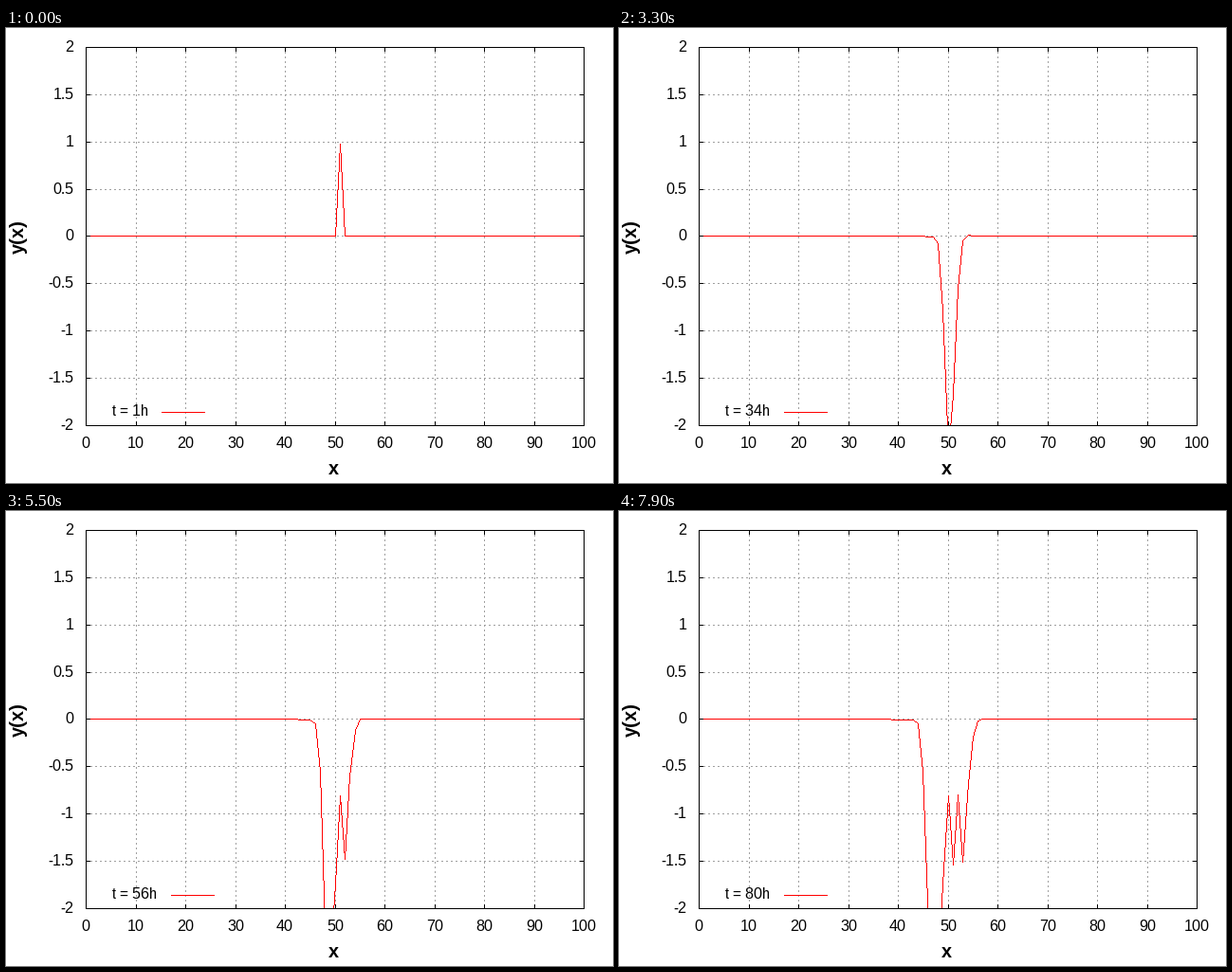
Animation, 640 px wide and 480 px high, one loop 8000 ms. Source, as a matplotlib script:

```python
import numpy as np
import matplotlib
import matplotlib.pyplot as plt
from matplotlib.animation import FuncAnimation

matplotlib.rcParams["font.family"] = "Liberation Sans"
matplotlib.rcParams["text.hinting"] = "native"
matplotlib.rcParams["text.hinting_factor"] = 1

W, H, DPI = 640, 480, 100
LEFT, RIGHT, TOP, BOTTOM = 84, 609, 20, 419
PX = 72 / DPI  # one pixel in points
RED, GRID = (255, 0, 0, 255), "#a0a0a0"
SITES = np.arange(101)
SOURCE = 51  # the driven site


def col(x):
    """Pixel column of a data x value."""
    return np.floor(LEFT + x * (RIGHT - LEFT) / 100 + 0.5)


def row(y):
    """Pixel row of a data y value."""
    return BOTTOM - np.floor((y + 2) * (BOTTOM - TOP) / 4 + 0.5)


def logistic(z):
    return 0.5 + 0.5 * np.tanh(z / 2)


def profile(t):
    """Trough that spreads both ways from the driven site, t in hours."""
    i = SITES
    ahead = i - SOURCE - 1
    rise = np.where(i < SOURCE,
                    logistic((t - 26 - 12 * (SOURCE - 1 - i)) / 4.4),
                    logistic((t - 32 - 20 * ahead) / 7))
    rise[SOURCE] = 1

    # The deep crest decays to a shelf whose neighbours swing in opposition
    settled = logistic((t + 24 * ahead) / 5)
    swing = 0.37 * np.cos(2 * np.pi * (t - 56) / 48) * np.where(i % 2, 1, -1)
    y = -rise * (1.17 + 1.58 * (1 - settled)) + swing * settled * rise ** 2

    # Small positive ripple running before the right front
    k = np.maximum(ahead, 0)
    ripple = 0.15 * 0.4 ** k * np.exp(-((t - 16 - 11 * k) / 7) ** 2 / 2)
    y += np.where(ahead >= 0, ripple, 0)

    y[SOURCE] = max(y[SOURCE], 0.98 - 0.204 * (t - 1))
    y[np.abs(y) < 0.01] = 0

    # Faint foot creeping out before the left front
    foot = (i < SOURCE) & (i > 47.4 - 0.16 * (t - 25))
    return np.where(foot, np.minimum(y, -0.01), y)


def trace(xs, ys):
    """Layer holding a hard one-pixel line, clipped to the plot box."""
    layer = np.zeros((H, W, 4), np.uint8)
    for xa, ya, xb, yb in zip(xs, ys, xs[1:], ys[1:]):
        n = int(max(abs(xb - xa), abs(yb - ya))) + 1
        c = np.floor(np.linspace(xa, xb, n) + 0.5).astype(int)
        r = np.floor(np.linspace(ya, yb, n) + 0.5).astype(int)
        inside = (r >= TOP) & (r <= BOTTOM)
        layer[r[inside], c[inside]] = RED
    return layer


fig = plt.figure(figsize=(W / DPI, H / DPI), dpi=DPI, facecolor="white")
ax = fig.add_axes([0, 0, 1, 1])
ax.axis("off")
curve = ax.imshow(np.zeros((H, W, 4), np.uint8), extent=(0, W, H, 0),
                  aspect="auto", interpolation="nearest", zorder=3)
ax.set_xlim(0, W)
ax.set_ylim(H, 0)


def stroke(xs, ys, color="black", **kw):
    line, = ax.plot(xs, ys, color=color, lw=PX, antialiased=False,
                    snap=False, **kw)
    return line


def label(x, y, text, size=16, **kw):
    return ax.text(x, y, text, fontsize=size * PX, **kw)


x0, x1, y0, y1 = LEFT + .5, RIGHT + .5, TOP + .5, BOTTOM + .5
TICK = 4
dots = dict(color=GRID, linestyle=(0, (2, 3)), dash_capstyle="butt", zorder=1)

for v in range(0, 101, 10):
    c = col(v) + .5
    if 0 < v < 100:
        stroke([c, c], [y0, y1], **dots)
    stroke([c, c], [y1, y1 - TICK], zorder=4)
    stroke([c, c], [y0, y0 + TICK], zorder=4)
    label(c - .5, 443, str(v), ha="center", va="baseline")

for v in np.arange(-2, 2.1, 0.5):
    r = row(v) + .5
    if -2 < v < 2:
        stroke([x0, x1], [r, r], **dots)
    stroke([x0, x0 + TICK], [r, r], zorder=4)
    stroke([x1, x1 - TICK], [r, r], zorder=4)
    label(71.5, r + 4.5, f"{v:g}", ha="right", va="baseline")

stroke([x0, x1, x1, x0, x0], [y0, y0, y1, y1, y0], zorder=4)
label(345, 471, "x", 20, weight="bold", ha="center", va="baseline")
label(13, 220, "y(x)", 20, weight="bold", rotation=90, ha="center", va="center")

key_line = stroke([], [], "red", zorder=5)
key_text = label(150, 409, "", ha="right", va="baseline", zorder=5)


def draw(n):
    t = n + 1
    curve.set_data(trace(col(SITES), row(profile(t))))
    end = 150 if t < 10 else 160
    key_text.set_text(f"t = {t}h")
    key_text.set_x(end - 0.5)
    key_line.set_data([end + 14.5, end + 59.5], [405.5, 405.5])
    return curve, key_line, key_text


anim = FuncAnimation(fig, draw, frames=80, interval=100, repeat=True,
                     repeat_delay=0, blit=False)
plt.show()
```
